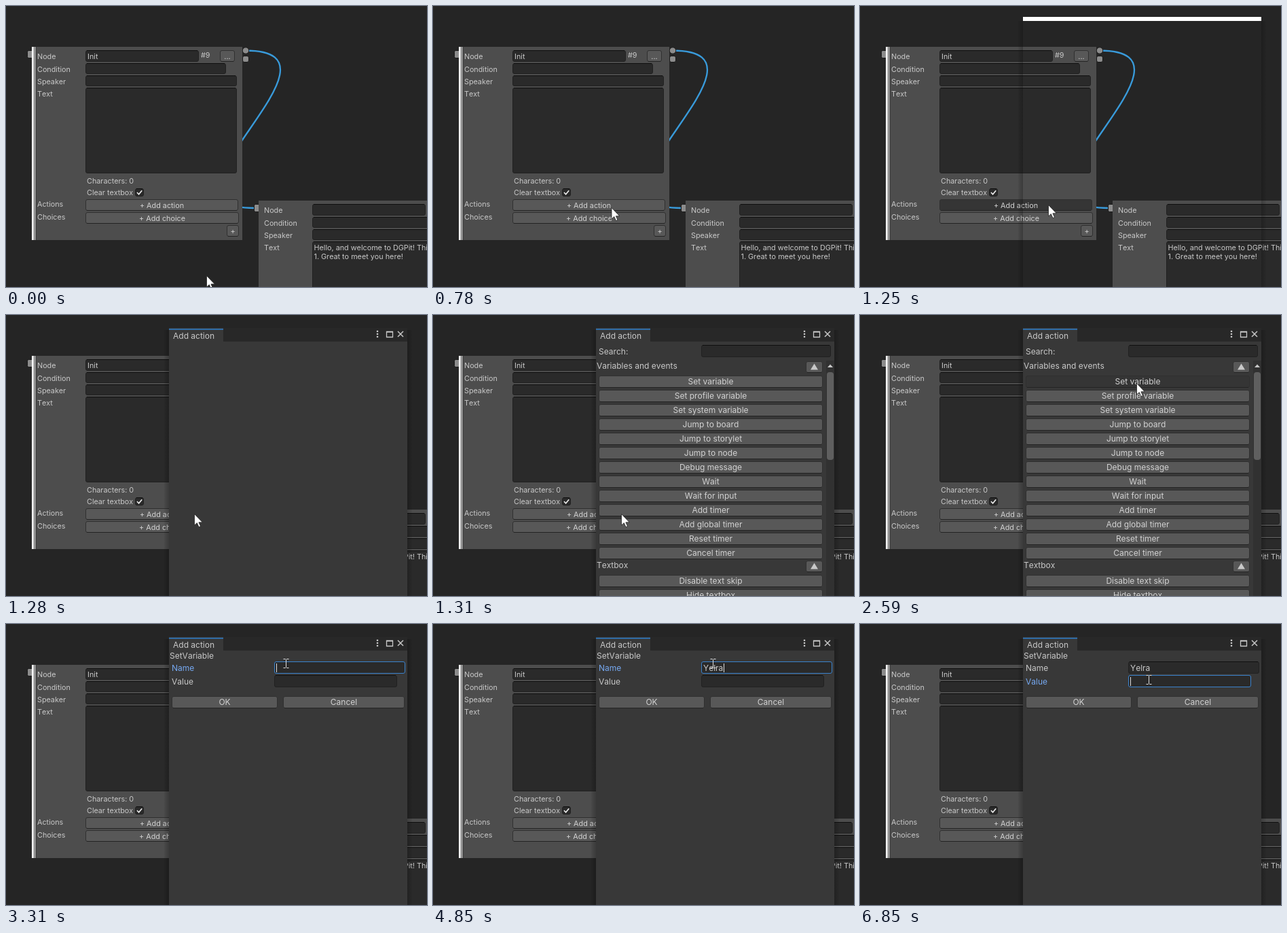
Recreate the animation shown at these times as an HTML page. Size 620x413 px, loop 8 s.

```html
<!DOCTYPE html>
<html lang="en">
<head>
<meta charset="utf-8">
<title>Add action dialog</title>
<style>
  html, body { margin: 0; width: 100%; height: 100%; overflow: hidden; background: #252525; }
  svg { display: block; width: 620px; height: 413px; font: 12px Inter, sans-serif; fill: #c8c8c8;
        font-kerning: none; font-variant-ligatures: none; font-feature-settings: "calt" 0; }
  text { white-space: pre; }
  .graph { font-size: 10.8px; }
  .mid { text-anchor: middle; }
  .btn rect { fill: #585858; stroke: #303030; }
  .btn path { stroke: #242424; }
  .btn text { fill: #d2d2d2; }
  .btn.pressed rect { fill: #353535; }
  .field rect { fill: #2a2a2a; stroke: #212121; }
  .field path { stroke: #0f0f0f; }
  .field.hover rect { stroke: #656565; }
  .field.focus rect { stroke: #3a82cc; }
  .field.hover path, .field.focus path { stroke: none; }
  .label.focus { fill: #76a9f2; }
  .wire { fill: none; stroke: #399bdb; stroke-width: 2.3; }
  .port { fill: #8c8c8c; stroke: #181818; }
</style>
</head>
<body>
<svg id="stage" viewBox="0 0 620 413"></svg>
<script>
const LOOP = 8000;
const NAME = 'Yelra';

const text = (x, y, value, attrs = '') => `<text x="${x}" y="${y}" ${attrs}>${value}</text>`;
const rect = (x, y, w, h, fill, attrs = '') =>
  `<rect x="${x}" y="${y}" width="${w}" height="${h}" fill="${fill}" ${attrs}/>`;
const outline = (x, y, w, h) => rect(x + .5, y + .5, w - 1, h - 1, 'none', 'rx="2.5"');
const field = (x, y, w, h, id = '') =>
  `<g class="field" id="${id}">${outline(x, y, w, h)}<path d="M${x + 2} ${y + .5}h${w - 4}"/></g>`;
const button = (x, y, w, h, label, baseline, id = '') =>
  `<g class="btn" id="${id}">${outline(x, y, w, h)}<path d="M${x + 2} ${y + h - .5}h${w - 4}"/>` +
  text(x + w / 2, baseline, label, 'class="mid"') + '</g>';

function node(dx, dy, name, lines) {
  const labels = [['Node', 78], ['Condition', 97], ['Speaker', 115], ['Text', 133],
                  ['Actions', 295], ['Choices', 314]];
  return `<g class="graph" transform="translate(${dx} ${dy})">
    <rect class="port" x="31.5" y="65.5" width="10" height="11" rx="2"/>
    ${rect(38, 60, 310, 284, '#4d4d4d')}
    ${labels.map(([s, y]) => text(46, y, s)).join('')}
    ${field(117, 65, 167, 17)}${field(117, 84, 207, 16)}
    ${field(117, 102, 223, 16)}${field(117, 120, 223, 126)}
    ${text(120, 78, name)}${text(287, 76, '#9')}
    ${lines.map((s, i) => text(119.5, 133 + 13 * i, s)).join('')}
    ${button(315, 65, 22, 17, '...', 78)}
    ${text(119, 261, 'Characters: 0')}${text(119, 278, 'Clear textbox')}
    ${field(190, 268, 13, 12)}
    <path d="M193 274l2.6 2.8 4.6-5.6" fill="none" stroke="#eee" stroke-width="1.6"/>
    ${button(117, 284, 225, 17, '+ Add action', 297, name ? 'addAction' : '')}
    ${button(117, 303, 226, 17, '+ Add choice', 316)}
    ${button(325, 322, 18, 17, '+', 335)}
  </g>`;
}

const graph = `
  <path class="wire" d="M353 65.5C525 65.5 192 297 366 297"/>
  ${node(334, 226, '', ['Hello, and welcome to DGPit! This', '1. Great to meet you here!'])}
  ${node(0, 0, 'Init', [])}
  ${rect(38, 60, 5, 284, '#2b2b2b')}${rect(38, 60, 3, 284, '#fff')}${rect(42, 60, 1, 284, '#fff')}
  <circle class="port" cx="353" cy="65.5" r="4.7"/>
  <rect class="port" x="348.5" y="73.5" width="9" height="9" rx="2.5"/>`;

const fold = y => button(549, y, 25, 17, '', 0) +
  `<path d="M556 ${y + 12.5}h11l-5.5-9z"/>`;

const actions = ['Set variable', 'Set profile variable', 'Set system variable', 'Jump to board',
  'Jump to storylet', 'Jump to node', 'Debug message', 'Wait', 'Wait for input', 'Add timer',
  'Add global timer', 'Reset timer', 'Cancel timer'];
const actionButton = (label, y, id) => button(244, y, 330, 18, label, y + 13, id);

const list = `
  ${text(244, 57.5, 'Search:')}${field(395, 44, 191, 18)}
  ${text(241, 79, 'Variables and events')}${fold(68)}
  ${actions.map((s, i) => actionButton(s, 89 + 21 * i, i ? '' : 'setVariable')).join('')}
  ${text(241, 372, 'Textbox')}${fold(361)}
  ${actionButton('Disable text skip', 382)}${actionButton('Hide textbox', 403)}
  ${rect(579, 67, 12, 346, '#313131')}${rect(580, 84, 10, 129, '#5f5f5f', 'rx="4"')}
  <path d="M581 77h8l-4-4.5z"/>`;

const form = `
  ${text(241, 51, 'SetVariable')}
  ${text(244, 69, 'Name', 'class="label" id="nameLabel"')}${field(395, 55, 193, 18, 'nameField')}
  ${text(244, 89, 'Value', 'class="label" id="valueLabel"')}${field(395, 75, 181, 18, 'valueField')}
  ${text(398, 69, '', 'id="typed"')}
  ${rect(0, 0, 1, 13, '#ddd', 'id="caret"')}
  ${button(244, 106, 156, 18, 'OK', 119)}${button(408, 106, 179, 18, 'Cancel', 119)}`;

const dialog = `
  ${rect(240, 19, 351, 394, '#383838')}${rect(320, 19, 271, 20, '#282828')}
  ${rect(240, 20, 80, 2, '#2f6ba6')}
  ${text(246, 35, 'Add action')}
  ${[24, 28, 32].map(y => `<circle cx="547" cy="${y}" r="1.3"/>`).join('')}
  <path d="M560.5 24.5h9v8h-9zM560 25h10" fill="none" stroke="#c8c8c8" stroke-width="1.3"/>
  <path d="M577 24l8 8m0-8l-8 8" stroke="#c8c8c8" stroke-width="1.5"/>`;

const shade = (id, from, to) => `<linearGradient id="${id}">
  <stop stop-opacity="${from}"/><stop offset="1" stop-opacity="${to}"/></linearGradient>`;

const stage = document.getElementById('stage');
stage.innerHTML = `
  <defs>${shade('shadeLeft', .05, .24)}${shade('shadeRight', .2, .03)}</defs>
  ${rect(0, 0, 620, 413, '#252525')}${graph}
  <g id="shadow">${rect(233, 22, 7, 391, 'url(#shadeLeft)')}${rect(591, 22, 7, 391, 'url(#shadeRight)')}</g>
  ${rect(240, 16, 351, 6, '#fff', 'id="flash"')}
  <g id="dialog">${dialog}</g><g id="list">${list}</g><g id="form">${form}</g>
  <path id="arrow" d="M.5 .5V17L4.3 13.6 7 19.6 9.5 18.5 6.9 12.8H12.3Z" fill="#fff" stroke="#222" stroke-width=".8"/>
  <path id="beam" d="M-4 -6.5h3l1 1 1-1h3M0 -5.5V5.5M-4 6.5h3l1-1 1 1h3" fill="none" stroke="#ddd"/>`;

const el = Object.fromEntries([...stage.querySelectorAll('[id]')].filter(e => e.id).map(e => [e.id, e]));

// Pointer track: [time, x, y], each position held until the next.
const track = [[0, 295, 396], [30, 240, 332], [60, 201, 288], [80, 248, 300]];
function glide(start, end, count, x, y) {
  const [, x0, y0] = track[track.length - 1];
  for (let i = 1; i <= count; i++) {
    const u = i / count, k = u * u * (3 - 2 * u);
    track.push([start + (end - start) * (i - 1) / (count - 1), x0 + (x - x0) * k, y0 + (y - y0) * k]);
  }
}
glide(580, 1010, 12, 277, 292);
glide(1680, 2010, 11, 452, 109);
track.push([2220, 400, 97], [2250, 359, 92], [2280, 407, 100]);
glide(2960, 3100, 6, 412, 58);
glide(6530, 6640, 5, 425, 82);

const keyTimes = [4370, 4520, 4580, 4730, 4850];

const show = (e, on) => e.setAttribute('visibility', on ? 'visible' : 'hidden');
const place = (e, x, y) => e.setAttribute('transform', `translate(${x} ${y})`);

function render(t) {
  const within = (a, b) => t >= a && t < b;
  const inForm = t >= 2680;
  show(el.shadow, t >= 1250);
  show(el.flash, within(1250, 1280));
  show(el.dialog, t >= 1280);
  show(el.list, within(1310, 2680));
  show(el.form, inForm);
  el.addAction.classList.toggle('pressed', within(1190, 1280));
  el.setVariable.classList.toggle('pressed', within(2590, 2680));

  const [, x, y] = track.findLast(p => p[0] <= t);
  const overName = inForm && y >= 55 && y < 73;
  const overValue = inForm && y >= 75 && y < 93;
  const overField = overName || overValue;
  show(el.arrow, !overField);
  show(el.beam, overField);
  place(el.arrow, x, y);
  place(el.beam, x + .5, y);

  const nameFocus = within(3310, 6850), valueFocus = t >= 6850;
  for (const [key, over, focus] of [['name', overName, nameFocus], ['value', overValue, valueFocus]]) {
    el[key + 'Field'].classList.toggle('hover', over);
    el[key + 'Field'].classList.toggle('focus', focus);
    el[key + 'Label'].classList.toggle('focus', focus);
  }
  el.typed.textContent = NAME.slice(0, keyTimes.filter(k => k <= t).length);
  const typedWidth = nameFocus && t >= keyTimes[0] ? el.typed.getComputedTextLength() : 0;
  show(el.caret, nameFocus || valueFocus);
  place(el.caret, Math.round(398.4 + typedWidth), valueFocus ? 78 : 58);
}

const start = performance.now();
function frame() {
  render((performance.now() - start) % LOOP);
  requestAnimationFrame(frame);
}
frame();
</script>
</body>
</html>
```
